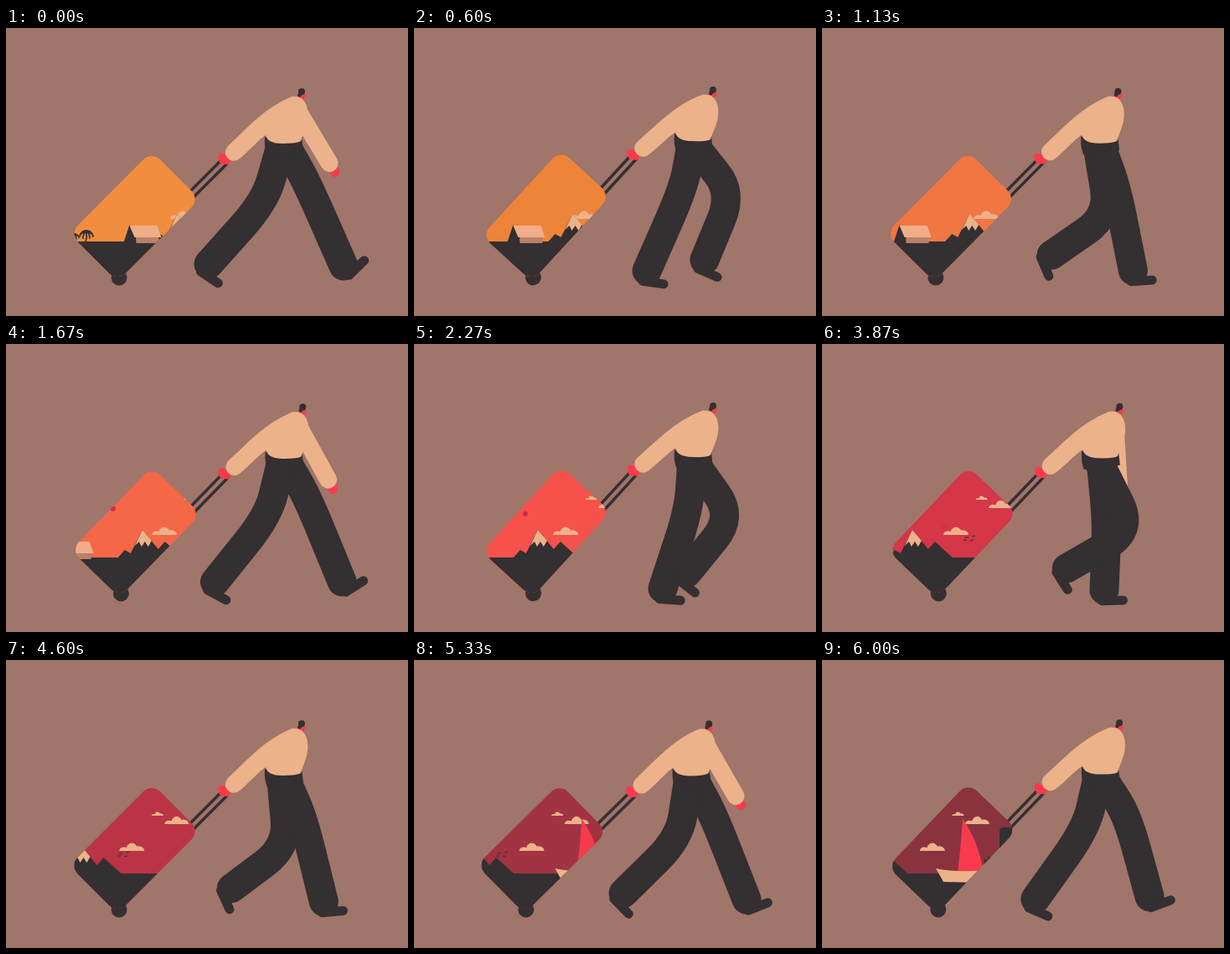
An HTML page with a canvas for the animation above (6.07 s loop, 480x344 px).

```html
<!DOCTYPE html>
<html lang="en">
<head>
<meta charset="utf-8">
<title>Traveller with suitcase</title>
<style>
  html, body { margin: 0; width: 100%; height: 100%; overflow: hidden; background: #a0756a; }
  canvas { display: block; }
</style>
</head>
<body>
<canvas id="stage" width="480" height="344"></canvas>
<script>
const ctx = document.getElementById('stage').getContext('2d');
const LOOP = 6070, FRAME = 1 / 15, STEP = 0.875;
const DARK = '#342f31', RED = '#f93a4d', SKIN = '#ecb28a', BACK = '#a0756a';
const RAD = Math.PI / 180;

// One leg over two steps: phase, knee x/y, ankle x/y, foot angle
const GAIT = [
  [0, 358, 182, 403, 284, -40],
  [0.13, 357, 186, 394, 287, -10],
  [0.27, 354, 190, 377, 289, 0],
  [0.423, 340, 215, 336, 294, 3],
  [0.686, 322, 190, 278, 290, 13],
  [0.909, 313, 205, 249, 284, 33],
  [1, 309, 207, 242, 282, 38],
  [1.27, 338, 223, 271, 272, 71],
  [1.423, 372, 222, 293, 268, 62],
  [1.686, 380, 197, 347, 277, 28],
  [1.909, 360, 184, 402, 284, -29]
];

// Sky colour: seconds, r, g, b
const SKY = [
  [0, 242, 141, 62], [0.6, 238, 131, 58], [1.67, 244, 104, 72], [2.87, 243, 60, 79],
  [3.87, 213, 54, 72], [4.6, 186, 52, 70], [6, 138, 51, 63], [6.1, 136, 51, 63]
];

const mix = (a, b, t) => a + (b - a) * t;
const mixPoint = (a, b, t) => [mix(a[0], b[0], t), mix(a[1], b[1], t)];

function fill(color, shape) {
  ctx.fillStyle = color;
  ctx.fill(new Path2D(shape));
}

function stroke(color, width, shape) {
  ctx.strokeStyle = color;
  ctx.lineWidth = width;
  ctx.stroke(new Path2D(shape));
}

function disc(color, x, y, r) {
  ctx.fillStyle = color;
  ctx.beginPath();
  ctx.arc(x, y, r, 0, 7);
  ctx.fill();
}

function group(draw) {
  ctx.save();
  draw();
  ctx.restore();
}

function rotateAbout(angle, x, y) {
  ctx.translate(x, y);
  ctx.rotate(angle * RAD);
  ctx.translate(-x, -y);
}

function skyColor(t) {
  const i = SKY.findIndex(k => k[0] > t);
  const a = SKY[i - 1], b = SKY[i], f = (t - a[0]) / (b[0] - a[0]);
  return `rgb(${[1, 2, 3].map(c => mix(a[c], b[c], f)).join()})`;
}

// Smooth periodic interpolation through the gait keys
function legPose(phase) {
  const p = phase % 2, n = GAIT.length;
  const key = j => {
    const row = [...GAIT[(j + n) % n]];
    row[0] += 2 * Math.floor(j / n);
    return row;
  };
  let i = n - 1;
  while (GAIT[i][0] > p) i--;
  const [a, b, c, d] = [i - 1, i, i + 1, i + 2].map(key);
  const span = c[0] - b[0], u = (p - b[0]) / span;
  return [1, 2, 3, 4, 5].map(k => {
    const m0 = (c[k] - a[k]) / (c[0] - a[0]) * span;
    const m1 = (d[k] - b[k]) / (d[0] - b[0]) * span;
    const e = c[k] - b[k];
    return b[k] + u * (m0 + u * (3 * e - 2 * m0 - m1 + u * (m0 + m1 - 2 * e)));
  });
}

function drawLeg(phase, lift) {
  const [kx, ky, ax, ay, angle] = legPose(phase);
  const hip = [332 + (ax - 332) * 0.05 + 2 * lift, 143 - 4 * lift];
  const knee = [kx, ky], ankle = [ax, ay];
  stroke(DARK, 35, `M${hip}L${mixPoint(hip, knee, 0.6)}Q${knee} ${mixPoint(knee, ankle, 0.4)}L${ankle}`);
  group(() => {
    ctx.translate(ax, ay);
    ctx.rotate(angle * RAD);
    stroke(DARK, 11, 'M-2 13L23 11');
  });
}

function drawArm(phase) {
  const swing = Math.max(-16, -4 + 35 * Math.cos(Math.PI * phase));
  group(() => {
    ctx.translate(348, 98);
    ctx.rotate(-swing * RAD);
    disc(RED, 0, 86, 6);
    stroke(SKIN, 21, 'M0 0V74');
  });
}

function drawTorso() {
  stroke(RED, 8, 'M257 154L264 159');
  disc(RED, 260, 157, 6);
  disc(RED, 353, 81, 4.5);
  disc(DARK, 353, 76, 4);
  stroke(DARK, 4.5, 'M352 77L350.5 80');
  fill(SKIN, `M265 141C286 122 307 96 341 82Q357 80 360 98C362 112 356 122 352 135
    Q348 138 330 138Q312 138 310 128C300 135 290 147 279 156A10 10 0 0 1 265 141Z`);
}

function at(x, draw) {
  group(() => {
    ctx.translate(x, 0);
    draw();
  });
}

function cloud(x, base, w) {
  ctx.fillStyle = SKIN;
  for (const [dx, r, h] of [[-0.32, 0.18, 0.15], [0, 0.24, 0.32], [0.27, 0.23, 0.19]]) {
    ctx.beginPath();
    ctx.ellipse(x + dx * w, base, r * w, h * w, 0, Math.PI, 0);
    ctx.fill();
  }
}

function palm(x, s) {
  group(() => {
    ctx.translate(x, 256);
    ctx.scale(s, s);
    stroke(DARK, 1.8, 'M-1 0Q1 -6 0 -13M-8 -7Q-7 -13 0 -13Q7 -13 8 -7M-4 -5Q-4 -11 0 -13Q4 -11 4 -5');
    fill(DARK, 'M-8 -9Q-6 -15 0 -15Q6 -15 8 -9Q0 -13 -8 -9Z');
  });
}

function drawScenery(t) {
  const near = -48.5 * t, middle = -25 * t, far = -13.2 * t;
  ctx.fillStyle = skyColor(t);
  ctx.fillRect(60, 130, 190, 190);

  ctx.globalAlpha = Math.min(1, Math.max(0, 4.3 - t));
  disc('#cb2c40', 114 + 8.3 * t, 180 + 10 * t, 3);
  ctx.globalAlpha = 1;

  cloud(211 + far, 228, 30);
  cloud(264.5 + far, 196, 29);
  cloud(241.5 + far, 186, 14);

  ctx.fillStyle = DARK;
  ctx.fillRect(60, 255, 190, 60);
  at(204.5 + middle, () => {
    fill(DARK, 'M-30 256L-21 246L-14 250L0 222L19 245L27 236L49 256Z');
    fill(SKIN, 'M0 222L-9 241L-4 236L-1 242L3 236L7 242L11 235Z');
  });
  at(362 + middle, () => fill(DARK, 'M-18 256V238H-14V235H-6V232H0V204Q0 200 5 200H30V256Z'));

  palm(96 + near, 1);
  palm(81 + near, 0.75);
  at(147.5 + near, () => {
    fill(DARK, 'M-7 256L0 235L8 250V256Z');
    fill('#b98068', 'M8 249H35V257H8Z');
    fill('#f0ae88', 'M0 236H33L38 250H6Z');
  });
  at(365 + near, () => stroke(DARK, 1, 'M-7 231H-3M2 230L5 229M-8 234H-5M0 235L3 234'));
  at(427 + near, () => {
    fill(RED, 'M32 190Q50 215 57 253L26 254Q30 222 32 190Z');
    fill(SKIN, 'M0 249Q30 255 66 250L54 266L9 265Z');
  });
}

function drawCase(t, lift) {
  const body = new Path2D();
  body.roundRect(-40.5, -69.5, 81, 139, 14);
  group(() => {
    ctx.translate(1.5 * lift, -6.5 * lift);
    rotateAbout(-3 * lift, 260, 157);
    ctx.translate(153.5, 225);
    ctx.rotate(45 * RAD);
    stroke(DARK, 3.5, 'M25.8 -68V-119M33.6 -66V-123');
    disc(DARK, 38.5, 64.7, 9.5);
    ctx.clip(body);
    // The landscape stays level while the case tilts
    ctx.setTransform(1, 0, 0, 1, 0, 0);
    drawScenery(t);
  });
}

function draw(t) {
  const phase = t / STEP;
  const lift = (1 - Math.cos(2 * Math.PI * (phase - 0.13))) / 2 - 0.15;
  const withBody = part => group(() => {
    ctx.translate(1.5 * lift, -6.5 * lift);
    rotateAbout(2.5 * lift, 262, 155);
    part();
  });
  ctx.lineCap = ctx.lineJoin = 'round';
  ctx.fillStyle = BACK;
  ctx.fillRect(0, 0, 480, 344);
  drawCase(t, lift);
  withBody(() => drawArm(phase));
  drawLeg(phase, lift);
  drawLeg(phase + 1, lift);
  withBody(() => {
    fill(DARK, 'M309 130L353 131L355 146L312 152Q308 142 309 130Z');
    drawTorso();
  });
}

function tick() {
  const frame = Math.floor((performance.now() % LOOP + 3.5) / (1000 * FRAME));
  draw(Math.min(90, frame) * FRAME);
  requestAnimationFrame(tick);
}
tick();
</script>
</body>
</html>
```
